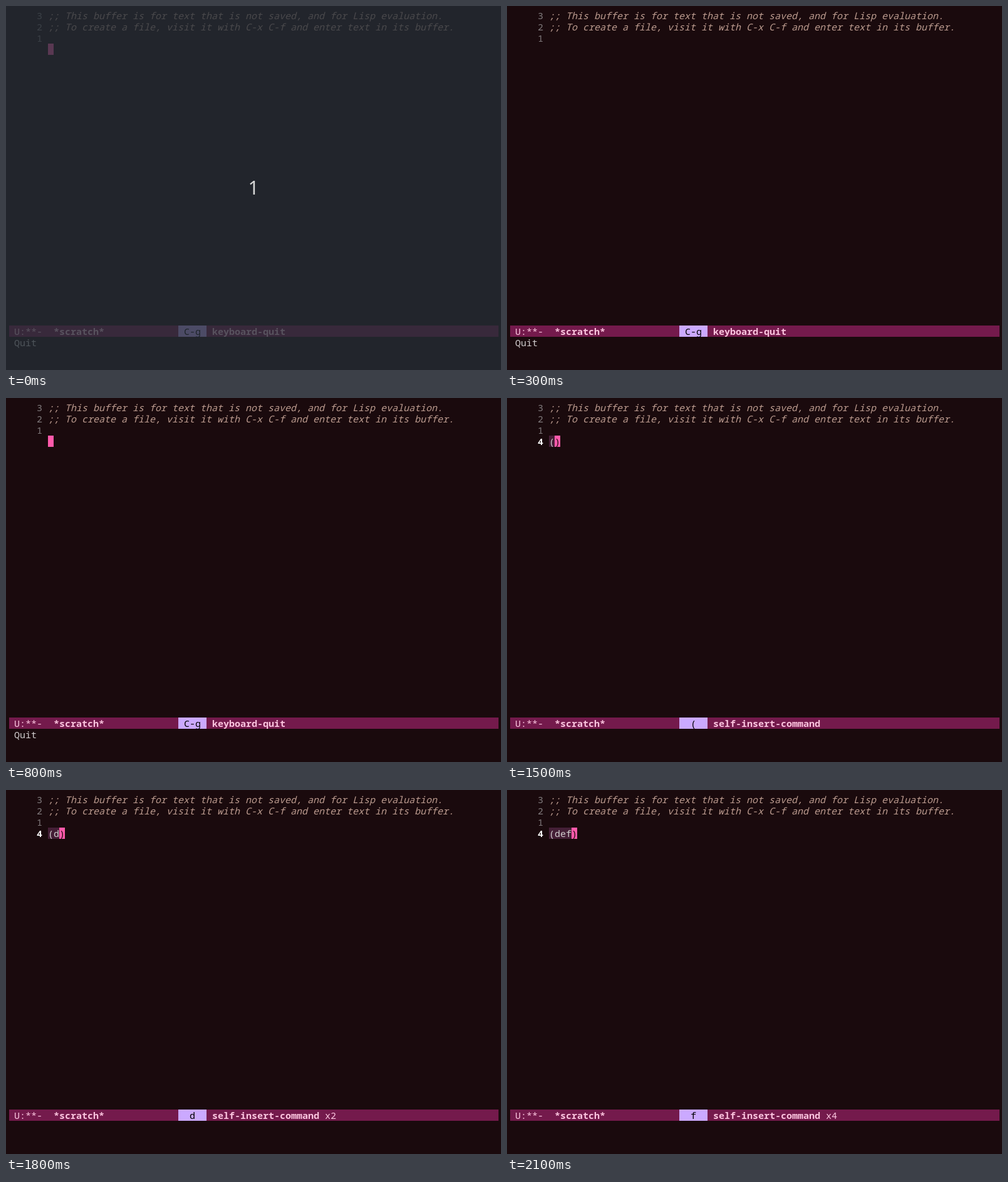
These frames come from a looping animation (790x581 px, 8 s). An HTML page with a canvas:

```html
<!DOCTYPE html>
<html lang="en">
<head>
<meta charset="utf-8">
<title>Scratch buffer</title>
<style>
  html, body { margin: 0; width: 100%; height: 100%; overflow: hidden; background: #1a0a0d; }
  canvas { display: block; }
</style>
</head>
<body>
<canvas id="stage" width="790" height="581"></canvas>
<script>
const ctx = document.getElementById('stage').getContext('2d');
const LOOP = 8000, CELL = 9, ROW = 18, LEFT = 67, MODELINE = 510;
const PINK = '#ff5aaa', BACK = '#1a0a0d', MODE_TEXT = '#fcc5df';

// Start time of each key, in ms
const keys = [[1500, '('], [1800, 'd'], [2000, 'e'], [2100, 'f']];

function box(x, y, width, height, color) {
  ctx.fillStyle = color;
  ctx.fillRect(x, y, width, height);
}

// Writes text in the row whose top edge is at y
function write(text, x, y, color, style = '') {
  ctx.font = `${style} 15px "Noto Sans Mono", "DejaVu Sans Mono", monospace`;
  ctx.fillStyle = color;
  ctx.fillText(text, x, y + 15);
}

function drawComments() {
  const lines = [
    ';; This buffer is for text that is not saved, and for Lisp evaluation.',
    ';; To create a file, visit it with C-x C-f and enter text in its buffer.',
    ''
  ];
  lines.forEach((line, i) => {
    const y = 6 + i * ROW;
    write(3 - i, 49, y, '#807a7c');
    write(line, LEFT, y, '#bc9b8f', 'italic');
  });
}

function drawModeline(key, command, count) {
  box(5, MODELINE, 781, ROW, '#741a4c');
  write('U:**-', 13, MODELINE, MODE_TEXT);
  write('*scratch*', 76, MODELINE, MODE_TEXT, 'bold');
  box(275, MODELINE, 45, ROW, '#cba9ff');
  write(key, 297.5 - key.length * CELL / 2, MODELINE, '#000');
  write(command, 329, MODELINE, MODE_TEXT, 'bold');
  if (count > 1) write('x' + count, 329 + (command.length + 1) * CELL, MODELINE, MODE_TEXT);
}

function drawIdle(time) {
  const cursorOn = time < 300 || (time >= 800 && time < 1300);
  if (cursorOn) box(LEFT, 60, CELL, ROW, PINK);
  drawModeline('C-g', 'keyboard-quit', 1);
  write('Quit', 13, 528, '#d0cccd');
}

function drawTyping(typed) {
  const text = typed.map(([, key]) => key).join('');
  const end = LEFT + text.length * CELL;
  write('4', 49, 60, '#fff', 'bold');
  box(LEFT, 60, end - LEFT, ROW, '#441f36');
  write(text, LEFT, 60, '#d0cccd');
  box(end, 60, CELL, ROW, PINK);
  write(')', end, 60, BACK);
  drawModeline(text.at(-1), 'self-insert-command', typed.length);
}

function drawCountdown() {
  box(0, 0, 790, 581, 'rgba(38, 46, 55, .76)');
  ctx.font = '30px "Noto Sans", "Open Sans", sans-serif';
  ctx.fillStyle = '#d6d6d6';
  ctx.fillText('1', 386.5, 301);
}

function draw(now) {
  const time = now % LOOP;
  const typed = keys.filter(([start]) => time >= start);
  box(0, 0, 790, 581, BACK);
  drawComments();
  if (typed.length) drawTyping(typed);
  else drawIdle(time);
  if (time < 100) drawCountdown();
}

let origin;
function tick(now) {
  origin ??= now;
  draw(now - origin);
  requestAnimationFrame(tick);
}
requestAnimationFrame(tick);
</script>
</body>
</html>
```
